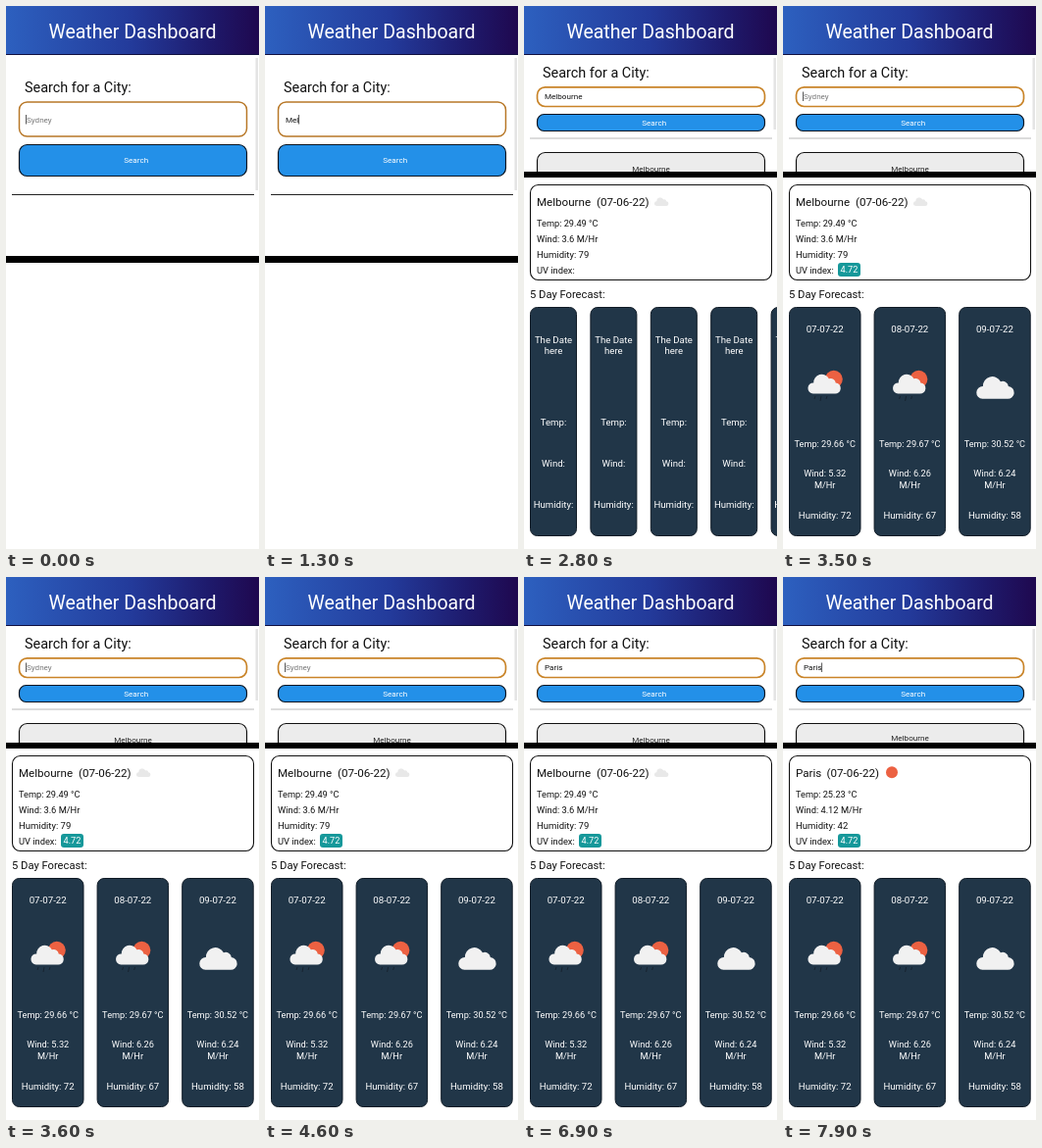
Write an HTML page that moves like this. It is 258 px wide and 554 px high and loops after 8000 ms.

```html
<!DOCTYPE html>
<html lang="en">
<head>
<meta charset="utf-8">
<title>Weather Dashboard</title>
<style>
  html, body { margin: 0; width: 100%; height: 100%; overflow: hidden; background: #fff; }
  svg { display: block; width: 100%; height: 100%; }
  text { font-family: Roboto, "Noto Sans", sans-serif; white-space: pre; }
</style>
</head>
<body>
<svg id="stage" viewBox="0 0 258 554"></svg>
<script>
const LOOP = 8000, RESULT = 2800, FORECAST = 3000, PARIS = 7700;
const stage = document.getElementById('stage');

// [start, typed text, caret shown]
const typing = [
  [0, '', 1], [400, '', 0], [900, 'M', 1], [1200, 'Me', 1], [1300, 'Mel', 1],
  [1500, 'Melb', 1], [1600, 'Melbo', 1], [1800, 'Melbou', 1], [1900, 'Melbour', 1],
  [2000, 'Melbourn', 1], [2300, 'Melbourne', 1], [RESULT, 'Melbourne', 0],
  [FORECAST, '', 0], [3200, '', 1], [3700, '', 0], [4200, '', 1], [4800, '', 0],
  [5200, '', 1], [5600, 'P', 1], [6100, 'Pa', 1], [6200, 'Par', 1], [6400, 'Pari', 1],
  [6500, 'Paris', 1], [6900, 'Paris', 0], [7300, 'Paris', 1]
];

const rect = (x, y, w, h, fill, r = 0, stroke = 'none', sw = 1) =>
  `<rect x="${x}" y="${y}" width="${w}" height="${h}" rx="${r}" fill="${fill}" stroke="${stroke}" stroke-width="${sw}"/>`;
const text = (s, x, y, size, fill = '#111', anchor = 'start', extra = '') =>
  `<text x="${x}" y="${y}" font-size="${size}" fill="${fill}" text-anchor="${anchor}" ${extra}>${s}</text>`;
const mid = (s, x, y, size, fill = '#fff') => text(s, x, y, size, fill, 'middle');
const sun = (x, y, r) => `<circle cx="${x}" cy="${y}" r="${r}" fill="#ec6142"/>`;
const cloud = (x, y, scale, fill) =>
  `<path transform="translate(${x} ${y}) scale(${scale})" fill="${fill}"
    d="M6 23A6 6 0 0 1 6.5 11A9 9 0 0 1 23.5 6.5A5.5 5.5 0 0 1 31 11A6 6 0 0 1 30 23Z"/>`;

const header = `<defs><linearGradient id="sky">
    <stop offset="0" stop-color="#2d60bf"/><stop offset=".5" stop-color="#233a9a"/>
    <stop offset=".8" stop-color="#1e1a6c"/><stop offset="1" stop-color="#1f084f"/></linearGradient></defs>`
  + rect(0, 0, 258, 50, 'url(#sky)') + rect(0, 49, 258, 1, '#111040')
  + mid('Weather Dashboard', 129, 33.2, 19.5);

function searchPanel(typed, open) {
  const base = open ? 95.3 : 118.7;
  return text('Search for a City:', 19, open ? 73 : 88, 14.4)
    + rect(254.5, 53, 2.5, open ? 73 : 135, '#e4e4e4')
    + (open
      ? rect(13.5, 82.8, 232, 19.7, '#fff', 8, '#c98428', 1.7) + rect(13.5, 110.5, 232, 17, '#2390e8', 7, '#0a1420', 1.2)
        + rect(6, 134, 247, 2, '#dcdcdc')
      : rect(13.5, 98, 232, 35, '#fff', 8, '#b87828', 1.5) + rect(13.5, 141.5, 232, 32, '#2390e8', 8, '#0a1420', 1.2)
        + rect(6, 192, 247, 1, '#222'))
    + mid('Search', 132.7, open ? 121.8 : 159.8, 8.1)
    + text(typed || 'Sydney', 21, base, 8.1, typed ? '#111' : '#777', 'start', 'id="field"');
}

function weather(paris, loaded) {
  const [city, temp, wind, humidity, dateX] = paris
    ? ['Paris', '25.23', '4.12', 42, 44.5] : ['Melbourne', '29.49', '3.6', 79, 74];
  return rect(13.5, 149.5, 232, 30, '#ececec', 8, '#111', 1.2)
    + mid('Melbourne', 129.5, paris ? 167.3 : 168.5, 8.1, '#222')
    + rect(0, 175, 258, 379, '#fff') + rect(0, 169, 258, 6, '#000')
    + rect(6.5, 182.5, 246, 97, '#fff', 8, '#111', 1.1)
    + text(city, 13, 203.5, 11.6) + text('(07-06-22)', dateX, 203.5, 11.6)
    + (paris ? sun(111, 199.3, 6) : cloud(132.8, 194.8, .4, '#e8e8e8'))
    + text(`Temp: ${temp} °C`, 13, 225.3, 9.2)
    + text(`Wind: ${wind} M/Hr`, 13, 241.3, 9.3)
    + text(`Humidity: ${humidity}`, 13, 257.3, 9.5)
    + text('UV index:', 13, 272.5, 9.3)
    + (loaded ? rect(56, 262, 23, 14, '#16989a', 3) + mid('4.72', 67.5, 272.4, 9.2) : '')
    + text('5 Day Forecast:', 6, 298, 11.2);
}

const card = (x, width) => rect(x + .5, 307.5, width - 1, 233, '#213648', 7, '#101b26');

function emptyCard(i) {
  const x = 6 + i * 61.4, c = x + 24;
  return card(x, 48)
    + [['The Date', 343.5], ['here', 355], ['Temp:', 427.5], ['Wind:', 469.5], ['Humidity:', 511.5]]
      .map(([s, y]) => mid(s, c, y, 9.6)).join('');
}

function dayCard([date, temp, wind, humidity], i) {
  const x = 6 + i * 86.6, c = x + 36.7;
  const icon = i < 2
    ? sun(x + 45.8, 380.8, 9)
      + `<path d="M${x + 27} 398l-1 3m7-3l-1 5m7-5l-1 3" stroke="#172330" fill="none"/>`
      + cloud(x + 19.2, 374.3, .92, '#f1f1f1')
    : cloud(x + 17.8, 376.4, 1.06, '#f1f1f1');
  return card(x, 73.5) + icon
    + mid(date, c, 332.6, 9.7)
    + mid(`Temp: ${temp} °C`, c, 449.6, 9.2)
    + mid(`Wind: ${wind}`, c, 480.4, 9.2) + mid('M/Hr', c, 491.8, 9.2)
    + mid(`Humidity: ${humidity}`, c, 522.8, 9.6);
}

const days = [
  ['07-07-22', '29.66', '5.32', 72],
  ['08-07-22', '29.67', '6.26', 67],
  ['09-07-22', '30.52', '6.24', 58]
];

let shown = '';
function draw(now) {
  const t = now % LOOP;
  const [, typed, caret] = typing.findLast(step => t >= step[0]);
  const open = t >= RESULT, loaded = t >= FORECAST, paris = t >= PARIS;
  const key = [typed, caret, open, loaded, paris].join();
  if (key !== shown) {
    shown = key;
    stage.innerHTML = header + searchPanel(typed, open)
      + (open
        ? weather(paris, loaded) + (loaded ? days.map(dayCard) : [0, 1, 2, 3, 4].map(emptyCard)).join('')
        : rect(0, 255, 258, 7, '#000'));
    if (caret) {
      const width = typed ? document.getElementById('field').getComputedTextLength() : -.7;
      stage.insertAdjacentHTML('beforeend', rect(21 + width, open ? 87.5 : 111, .7, 9.5, '#111'));
    }
  }
  requestAnimationFrame(draw);
}
draw(0);
</script>
</body>
</html>
```
